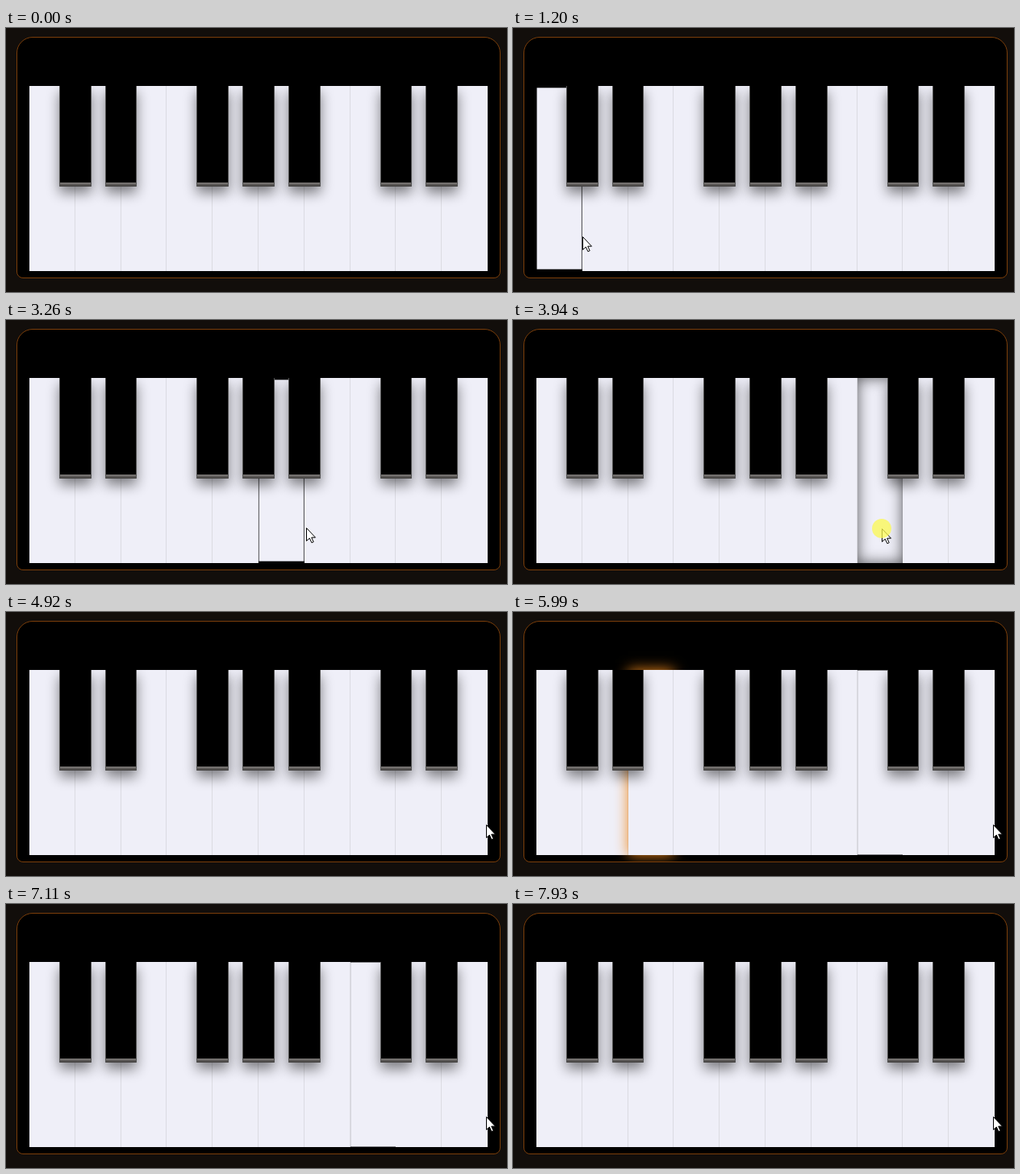
Recreate the animation shown at these times as an HTML page. Size 621 px wide and 328 px high, loop 8000 ms.

```html
<!DOCTYPE html>
<html lang="en">
<head>
<meta charset="utf-8">
<title>Piano</title>
<style>
  html, body { margin: 0; width: 100%; height: 100%; overflow: hidden; background: #120e0b; }
  .panel {
    position: absolute; left: 13px; top: 11px; width: 598px; height: 298px;
    border: 1px solid #7b3e0a; border-radius: 20px 20px 8px 8px;
    background: #000; overflow: hidden;
  }
  .keys { position: absolute; left: 15px; top: 60px; width: 568px; height: 230px; }
  .white, .black { position: absolute; top: 0; }
  .white {
    width: 10%; height: 100%;
    background: linear-gradient(to left, #dbdbe2 1px, #efeff8 1px);
  }
  .white:nth-child(10) { background: #efeff8; }
  .black {
    width: 7%; height: 125px; margin-left: -3.5%;
    background: linear-gradient(#000 120px, #85827f 120px, #64615f 122px, #3d3b3a 125px);
    box-shadow: 0 8px 16px rgba(0, 0, 0, .48), inset 1px 0 #555, inset -1px 0 #555;
  }
  #pointer { position: absolute; left: 0; top: 0; overflow: visible; }
</style>
</head>
<body>
<div class="panel"><div class="keys"></div></div>
<svg id="pointer" width="1" height="1">
  <path d="M.5.5V16.5L4.3 13.1 6.9 18.7 9.2 17.7 6.7 12.2H11.5Z" fill="#fff" stroke="#000"/>
  <circle id="spot" r="12" fill="#fbf850" fill-opacity=".75"/>
</svg>
<script>
const LOOP = 8000, STEP = 70;
const ENTER = 240, ENTER_TIME = 550, HOP_TIME = 4 * STEP;
const GLOW = '0 0 16px #f28a1c';
const PRESSED = 'inset 0 0 18px rgba(0, 0, 0, .65)';

const keyboard = document.querySelector('.keys');
const pointer = document.getElementById('pointer');
const spot = document.getElementById('spot');

function addKey(type, position) {
  const key = document.createElement('div');
  key.className = type;
  key.style.left = position * 10 + '%';
  keyboard.append(key);
  return key;
}
const whites = Array.from({ length: 10 }, (_, i) => addKey('white', i));
// Every octave of seven lacks a black key after its third and seventh white key
whites.forEach((_, i) => { if (i % 7 && i % 7 !== 3) addKey('black', i); });

// The mouse clicks each white key in turn, at these times
const clicks = [1060, 1530, 1940, 2370, 2780, 3120, 3660, 3940, 4360, 4710];

// A run without the mouse climbs in steps of three keys and wraps around
const run = (start, gap, first, count) =>
  Array.from({ length: count }, (_, n) => ({ key: (first + 3 * n) % 8, start: start + n * gap }));
const notes = [...run(5850, 2 * STEP, 7, 9), ...run(7580, STEP, 0, 3)];

// What a key shows, one entry per step: shadow and scale
const clickPhases = [[PRESSED, 1], [GLOW, .98], ['none', .98]];
const notePhases = [[GLOW, 1], [GLOW, .98], ['none', .996]];

const clamp = v => Math.min(1, Math.max(0, v));
const smooth = p => p * p * (3 - 2 * p);
const stepsSince = (time, start) => Math.floor((time - start) / STEP);

function setKey(key, [shadow, scale]) {
  const style = whites[key].style;
  style.boxShadow = shadow;
  style.transform = scale === 1 ? 'none' : `scale(${scale})`;
}

function pointerAt(time) {
  // Number of keys passed, gliding on by one after each click
  const passed = clicks.reduce((sum, click) =>
    sum + smooth(clamp(stepsSince(time, click) * STEP / HOP_TIME)), 0);
  const entry = clamp(stepsSince(time, ENTER) * STEP / ENTER_TIME + .1);
  const away = (1 - entry) ** 2;
  return [
    Math.min(595, 57 + 57.2 * passed) + 367 * away,
    257 + .18 * (passed - 3.75) ** 2 + 66 * away
  ].map(Math.round);
}

function draw(time) {
  whites.forEach((_, key) => setKey(key, ['none', 1]));
  const show = (key, phase) => { if (phase) setKey(key, phase); };
  clicks.forEach((click, key) => show(key, clickPhases[stepsSince(time, click)]));
  notes.forEach(({ key, start }) => show(key, notePhases[stepsSince(time, start)]));

  const [x, y] = pointerAt(time);
  pointer.style.transform = `translate(${x}px, ${y}px)`;
  pointer.style.visibility = time < ENTER ? 'hidden' : 'visible';
  spot.style.display = clicks.some(click => stepsSince(time, click) === 0) ? '' : 'none';
}

const origin = performance.now();
function frame() {
  draw((performance.now() - origin) % LOOP);
  requestAnimationFrame(frame);
}
frame();
</script>
</body>
</html>
```
